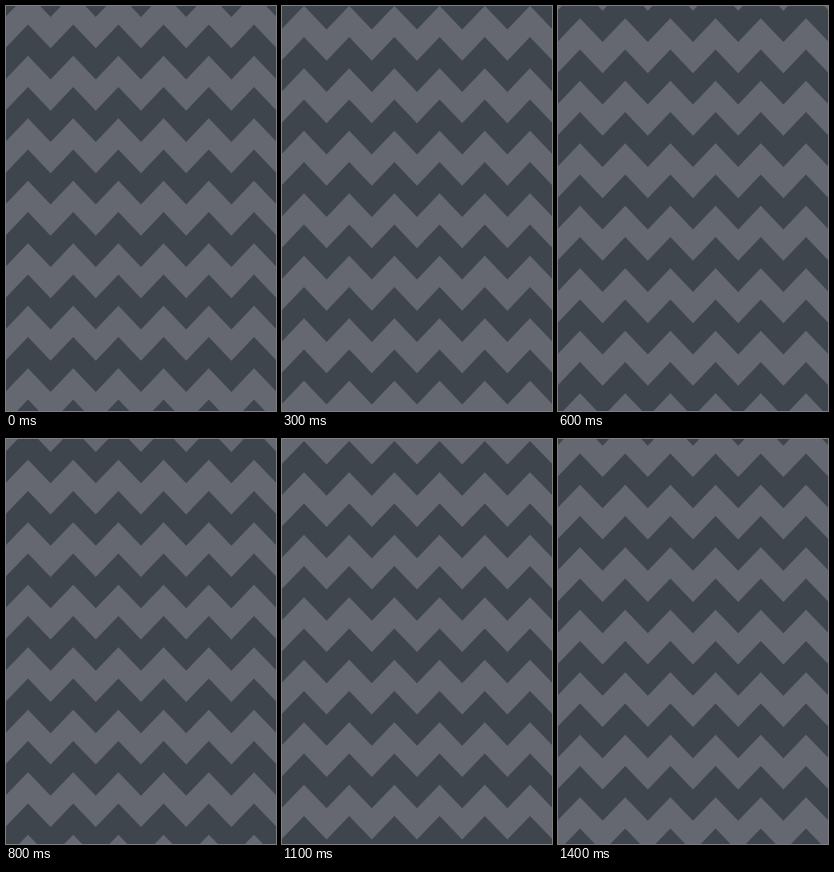
An HTML page with a canvas for the animation above (1500 ms loop, 270 by 405 pixels).

```html
<!DOCTYPE html>
<html>
<head>
<meta charset="utf-8">
<style>
  html, body { margin: 0; width: 100%; height: 100%; overflow: hidden; background: #3e454d; }
  canvas { display: block; }
</style>
</head>
<body>
<canvas id="stage" width="270" height="405"></canvas>
<script>
const ctx = document.getElementById('stage').getContext('2d');
const LOOP = 1500, STEP = 100;
const PERIOD = 62.5, BAND = PERIOD / 2;
const HALF_WAVE = 22.6, HEIGHT = 23.6, FIRST_PEAK = 49.8;

// Zigzag points around the centre line; valleys fall on even indices.
const zigzag = [];
for (let i = -7; i <= 7; i++) {
  zigzag.push([135 + i * HALF_WAVE, i % 2 ? 0 : HEIGHT]);
}

function drawBand(top) {
  ctx.beginPath();
  for (const [x, y] of zigzag) ctx.lineTo(x, top + y);
  for (const [x, y] of [...zigzag].reverse()) ctx.lineTo(x, top + BAND + y);
  ctx.fill();
}

function draw(time) {
  const step = Math.floor((time % LOOP) / STEP);
  const shift = step * STEP / LOOP * PERIOD;
  ctx.fillStyle = '#3e454d';
  ctx.fillRect(0, 0, 270, 405);
  ctx.fillStyle = '#666871';
  for (let i = -3; i < 7; i++) drawBand(FIRST_PEAK + shift + i * PERIOD);
}

const start = performance.now();
function tick() {
  draw(performance.now() - start);
  requestAnimationFrame(tick);
}
tick();
</script>
</body>
</html>
```
